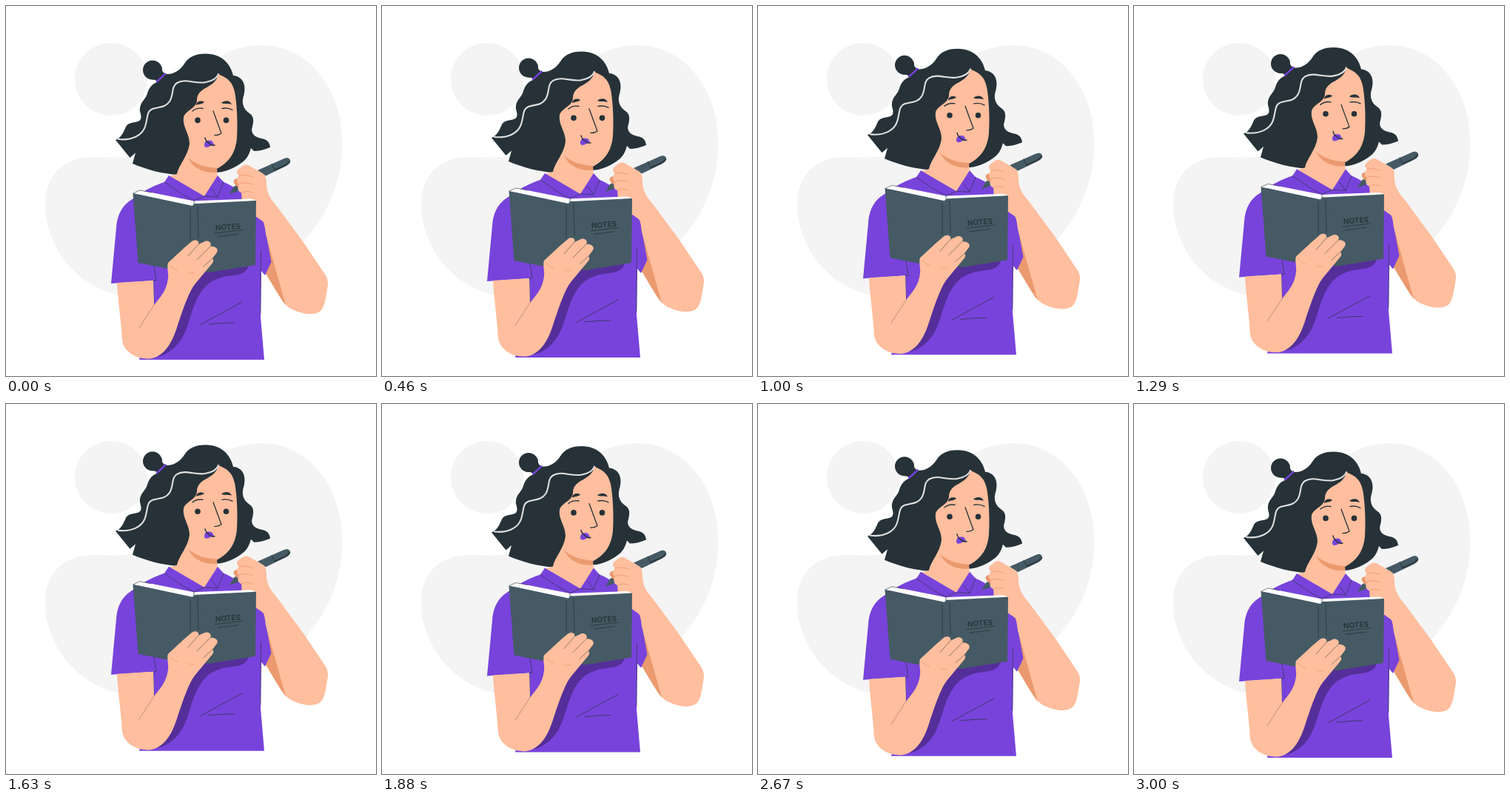
Animation, 500 px wide and 500 px high, one loop 3040 ms. Source, as an HTML page with a canvas:

```html
<!DOCTYPE html>
<html lang="en">
<head>
<meta charset="utf-8">
<title>Taking notes</title>
<style>
  html, body { margin: 0; width: 100%; height: 100%; overflow: hidden; background: #fff; }
  canvas { display: block; width: 500px; height: 500px; }
</style>
</head>
<body>
<canvas id="stage"></canvas>
<script>
const LOOP = 3040, CYCLE = 3000, STEP = 1000 / 24, RISE = 10;
const INK = '#263238', SLATE = '#455a64', SKIN = '#ffbe9d', TAN = '#eb996e',
      PURPLE = '#7843db', SHADE = '#542f99', PALE = '#f4f4f4';

const canvas = document.getElementById('stage');
const ctx = canvas.getContext('2d');
const dpr = window.devicePixelRatio || 1;
canvas.width = canvas.height = 500 * dpr;

const paths = {};
const path = d => paths[d] || (paths[d] = new Path2D(d));

function fill(color, d) {
  ctx.fillStyle = color;
  ctx.fill(path(d));
}

function line(color, width, d) {
  ctx.strokeStyle = color;
  ctx.lineWidth = width;
  ctx.stroke(path(d));
}

function dot(color, x, y, r) {
  ctx.fillStyle = color;
  ctx.beginPath();
  ctx.arc(x, y, r, 0, Math.PI * 2);
  ctx.fill();
}

function backdrop() {
  dot(PALE, 142, 99, 49);
  fill(PALE, 'M345 53C412 53 454.5 116 454.5 185C454.5 240 432 286 402 318C350 372 240 396 170 393' +
    'C102 388 53 330 53 268C53 226 80 204 120 204C150 204 185 210 212 180C246 140 258 53 345 53Z');
}

function head() {
  fill(INK, 'M204 103C196 106 193 112 191 118C189 126 182 129 181 138C180 144 184 147 182 153' +
    'C179 159 167 155 162 163C159 170 156 178 148 181L167.5 205L175 198.5L171 213' +
    'C190 221 212 227 232 228L285 225C302 224 316 214 322 209C327 204 329 199 331 192' +
    'L335 196C342 196 350 194 357 191C356 183 352 180 345 179C335 177 330 171 333 163' +
    'C335 155 335 149 329 145C320 139 318 130 321.5 120C325 107 320 95 307 94' +
    'C304 80 293 64.5 270 64.5C255 64.5 247 69 241 78C236 86 227 93 216 92Z');
  dot(INK, 198, 86.5, 13);
  fill(INK, 'M210.5 82C210 88 213 91 217 92L205 103C203 99 198 99.5 194 99Z');
  line(PURPLE, 2.4, 'M204 102Q210 97 215.5 91.5');
  line('#e0e0e0', 2.1, 'M152 180C170 182 184 175 188 163C192 150 190 142 198 139' +
    'C206 136 215 138 221 129C227 120 223 109 231 104C243 97 256 106 270 103C280 101 285 98 287 92');

  fill(SKIN, 'M287 92C299 97 306 102 309 116C312 130 313.5 160 312 179C310.5 196 303 209 290 217' +
    'L285 220L286 231L268 258L221 230L231 227C233 215 246 203 248 186C248 172 238 163 240 150' +
    'C244 140 258 138 258 127C259 108 283 112 287 92Z');
  fill(TAN, 'M246 205C256 214 270 218.5 285 219L284.5 225C266 226.5 252 218 246 205Z');

  fill(INK, 'M257 134C257 129 264 127 268 130C265 133 261 132 257 134Z');
  fill(INK, 'M291 131C295 127 303 127 305 133C300 131 296 133 291 131Z');
  line(INK, 1.4, 'M252 142Q258 137 266 138.5');
  line(INK, 1.4, 'M292 138.5Q300 137 306 140.5');
  dot(INK, 259, 154.4, 3.8);
  dot(INK, 297.5, 154.4, 3.8);
  line(INK, 1.3, 'M280 142L291 172Q287 175 282 174.5');
  fill(PURPLE, 'M268 188C268 183 272 181 275 182C278 181 280 184 281 188C276 188 275 191 271 191Q268 191 268 188Z');
  line(INK, 1.4, 'M269 178Q270 183 274 185Q277 189 282 188');
}

function shirt() {
  fill(TAN, 'M349 300L379 405C373 399 367 388 350 360Z');
  fill(PURPLE, 'M220 229L268 257L286 229L294 238C314 245 340 270 350 292L352 311L358.5 346' +
    'L350 364L345 358L344 420L349 478H180L200 404L199 371L142 375L149 300' +
    'C151 275 162 266 174 259C188 248 202 242 214 238Z');
  fill(SHADE, 'M328 351C325 360 318 363 307 364C288 366 276 371 267 382C251 402 250 425 240 445' +
    'C232 460 220 470 206 474L230 380L276 354Z');
  line(INK, .6, 'M214 238L239 255L254 263L268 257L286 258L294 238M278 247L286 258');
  line(INK, .6, 'M200 351L203 371L199 371L200 404');
  line(INK, .6, 'M344.5 331L344 416');
  line(INK, .7, 'M262 431L319 400M274 430Q293 428 309 428');
}

function rightArm() {
  fill(SLATE, 'M340 222L375 206.5C381 203.5 385 206.5 384 211C383 214 380 215 377 217L351 229.5Z');
  line(INK, 1.5, 'M363 221.5L378 215L383.5 210');
  line(INK, .8, 'M359 213.5L363 222');
  fill(SLATE, 'M302 254L308 244L318 237L321 246L311 251Z');
  fill(TAN, 'M308 239C306 234 312 232 318 233L318 244L312 244Z');
  fill(SKIN, 'M319 266L318 252C313 250 312 245 315 241C311 238 311 232 315 229C310 226 312 221 316 219' +
    'C320 215 325 213 329 216L348 227C352 230 352 236 352 242C353 257 361 264 367 272L401 318L432 364' +
    'C435 369 436 375 434 383C432 395 431 405 426 411C420 418 405 417 394 413C386 410 380 407 377 401' +
    'L351 308C350 299 349 293 347 291L337 284Z');
  line(TAN, .8, 'M315 229Q324 227 333 231M315 240Q324 237 333 241M318 252Q326 249 333 252');
}

function book() {
  fill('#fff', 'M172 253L181 249L254 263.5L264 263L331 260.5L338 262.5L258 272L252 271Z');
  line(INK, .6, 'M172 253L181 249L196 252');
  fill(SLATE, 'M171.5 253L252 270Q254 266 258 267L338 263L337 350L275 360L219 355L178.5 347Z');
  line(INK, .7, 'M249 274L249 316M259 270L260 314M254 263.5L254 267');
  line(INK, .8, 'M282 307L320 302.5M286 311.5L314 308');

  ctx.save();
  ctx.translate(300.2, 302);
  ctx.rotate(-.08);
  ctx.font = '600 10px Inter, "Open Sans", sans-serif';
  ctx.textAlign = 'center';
  ctx.fillStyle = INK;
  ctx.fillText('NOTES', 0, 0);
  ctx.restore();
}

function leftArm() {
  fill(SKIN, 'M150 374L199 371L200 404C210 392 217 384 219 368C220 362 217 352 219 347' +
    'C229 338 240 327 250 319C255 314 262 317 260 322L267 319C273 315 279 320 276 325' +
    'C282 324 288 328 285 333L279 341C282 344 279 348 276 351L256 375C247 386 240 408 233 428' +
    'C226 452 216 473 195 476.5C180 478 160 470 157 452C156 430 151 395 150 374Z');
  line(INK, .5, 'M260 322L246 338M276 325L258 343M279 341L267 352');
  line(TAN, .7, 'M222 350Q226 357 232 357M246 359Q251 363 255 360');
  line(INK, .3, 'M200 404L180 435');
}

function draw(now) {
  const t = now % LOOP;
  // 24 steps a second, switching on 10 ms ticks
  const at = Math.floor((t + 5) / STEP) * STEP;
  const lift = RISE * Math.max(0, 1 - Math.abs(at * 2 / CYCLE - 1));

  ctx.setTransform(dpr, 0, 0, dpr, 0, 0);
  ctx.fillStyle = '#fff';
  ctx.fillRect(0, 0, 500, 500);
  ctx.lineCap = ctx.lineJoin = 'round';
  backdrop();
  ctx.translate(0, -lift);
  head();
  shirt();
  rightArm();
  book();
  leftArm();
}

let start;
function tick(now) {
  if (start === undefined) start = now;
  draw(now - start);
  requestAnimationFrame(tick);
}
draw(0);
requestAnimationFrame(tick);
</script>
</body>
</html>
```
